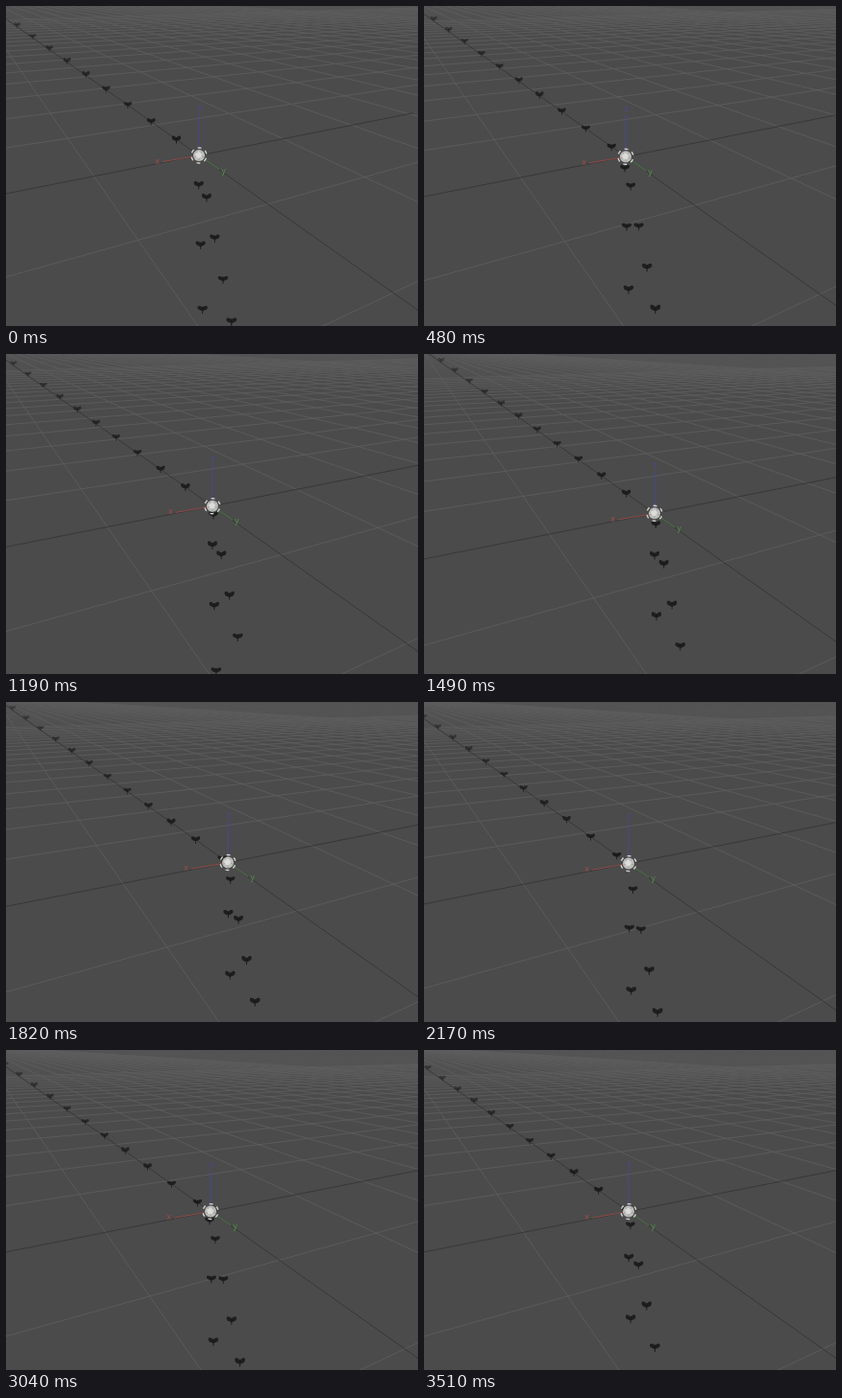
Animation, 429 px wide and 334 px high, one loop 3.61 s. Source, as an HTML page with a canvas:

```html
<!DOCTYPE html>
<html lang="en">
<head>
<meta charset="utf-8">
<title>Particle emitter in a 3D viewport</title>
<style>
  html, body { margin: 0; width: 100%; height: 100%; overflow: hidden; background: #4b4b4b; }
  canvas { display: block; width: 429px; height: 334px; }
</style>
</head>
<body>
<canvas id="view" width="429" height="334"></canvas>
<script>
const ctx = document.getElementById('view').getContext('2d');
const W = 429, H = 334, LOOP = 3610, STEPS = 61;

// Playback steps last 60 ms, a few of them 50 or 70 ms.
const SHORT = new Set([17, 25, 26, 27, 33, 37, 38, 42, 45, 58]);
const starts = [0];
for (let k = 0; k < STEPS - 1; k++) {
  starts.push(starts[k] + (SHORT.has(k) ? 50 : k === 47 ? 70 : 60));
}

// Screen position of the world origin while the view is panned: [ms, x, y].
const PAN = [[0, 201, 156], [60, 201, 156], [440, 210, 157.3], [1090, 210, 157.3],
  [1480, 240, 166.3], [1600, 240, 167], [2170, 213, 168.6], [LOOP, 213, 168.6]];

// Vanishing points relative to the origin, and perspective change per grid cell.
const VX = [872, -173], VY = [-244, -173];
const CELL_X = 0.1115, CELL_Y = 0.2266;
const RATE = 3.5, PHASE = 0.835;

function origin(t) {
  let i = 1;
  while (PAN[i][0] < t) i++;
  const [t0, x0, y0] = PAN[i - 1], [t1, x1, y1] = PAN[i];
  const u = (t - t0) / (t1 - t0), e = u * u * (3 - 2 * u);
  return [x0 + (x1 - x0) * e, y0 + (y1 - y0) * e];
}

function onAxis(vp, s) {
  return [vp[0] * s / (1 + s), vp[1] * s / (1 + s)];
}

function ray(vp, p) {
  const dx = p[0] - vp[0], dy = p[1] - vp[1], k = 2200 / Math.hypot(dx, dy);
  ctx.moveTo(vp[0], vp[1]);
  ctx.lineTo(vp[0] + dx * k, vp[1] + dy * k);
}

function gridLines(from, to, color) {
  ctx.strokeStyle = color;
  ctx.beginPath();
  for (let n = from; n <= to; n++) if (n) ray(VX, onAxis(VY, n * CELL_Y));
  ctx.stroke();
  ctx.beginPath();
  for (let n = from; n <= to; n++) if (n && n > -2) ray(VY, onAxis(VX, n * CELL_X));
  ctx.stroke();
}

function line(x0, y0, x1, y1, color) {
  ctx.strokeStyle = color;
  ctx.beginPath();
  ctx.moveTo(x0, y0);
  ctx.lineTo(x1, y1);
  ctx.stroke();
}

function label(text, x, y, color) {
  ctx.fillStyle = color;
  ctx.fillText(text, x, y);
}

function drawFloor() {
  ctx.lineWidth = 0.7;
  gridLines(21, 110, '#555555');
  ctx.lineWidth = 0.85;
  gridLines(-2, 20, '#5e5e5e');
  line(-260, 51.6, 223, -44.3, '#353535');
  ctx.strokeStyle = '#353535';
  ctx.beginPath();
  ray(VY, [0, 0]);
  ctx.stroke();
}

function drawAxes() {
  ctx.lineWidth = 1;
  line(0, 0, -38, 6.6, '#8f4a47');
  line(0, 0, 21, 14.5, '#4a7a45');
  line(0, 0, 0, -44, '#4a488f');
  label('x', -43.5, 6.5, '#a04a46');
  label('y', 25.5, 16.5, '#4f9048');
  label('z', 0.5, -49, '#4a489a');
}

function bird(x, y, size, alpha, flap) {
  const tip = -3.2 + 0.6 * flap;
  ctx.save();
  ctx.translate(x, y);
  ctx.scale(size, size);
  ctx.globalAlpha = alpha;
  ctx.fillStyle = '#1b1b1b';
  for (const side of [-1, 1]) {
    ctx.beginPath();
    ctx.moveTo(0, -1.2);
    ctx.quadraticCurveTo(side * 2, tip - 1, side * 4.8, tip);
    ctx.quadraticCurveTo(side * 6, -0.6, side * 3.6, 0.9);
    ctx.lineTo(side * 1.2, 1.9);
    ctx.lineTo(0, 1.9);
    ctx.fill();
  }
  ctx.fillRect(-0.8, -2.2, 1.6, 4.4);
  ctx.fillRect(-0.5, 2, 1, 3);
  ctx.restore();
}

// Three streams leave the emitter; q is the age in emission periods.
function drawBirds(phase) {
  for (let j = 11; j >= 0; j--) {
    const q = j + phase, flap = Math.sin(q * 5);
    const d = 29.2 * q / (1 + 0.041 * q);
    bird(-d, -0.72 * d, 0.92 - 0.024 * q, 1 - 0.055 * q, flap);
    if (j > 5) continue;
    const size = 0.93 + 0.03 * q;
    const right = 9 + 41 * q + 0.45 * q * q;
    bird(0.2 * right - 0.8, right, size, 0.95, flap);
    const down = -18 + 56 * q + 2.4 * q * q;
    if (down > 7) bird(0.03 * down - 1.2, down, size, 0.95, flap);
  }
}

function drawEmitter() {
  ctx.fillStyle = '#bdbdbb';
  ctx.beginPath();
  ctx.arc(0, 0, 6, 0, 7);
  ctx.fill();
  ctx.fillStyle = '#dcdcda';
  ctx.beginPath();
  ctx.arc(-0.5, -0.5, 3.2, 0, 7);
  ctx.fill();
  ctx.strokeStyle = '#d0d0ce';
  ctx.lineWidth = 1.4;
  for (let i = 0; i < 6; i++) {
    const a = i * Math.PI / 3 + 0.6;
    ctx.beginPath();
    ctx.arc(0, 0, 8, a - 0.24, a + 0.24);
    ctx.stroke();
  }
  ctx.lineWidth = 0.6;
  for (let i = 0; i < 5; i++) {
    const a = i * Math.PI * 0.4 + 0.3, c = Math.cos(a), s = Math.sin(a);
    line(3 * c, 3 * s, 6 * c, 6 * s, '#8d8d8b');
  }
}

function draw(t) {
  const [x, y] = origin(t);
  ctx.setTransform(1, 0, 0, 1, 0, 0);
  ctx.fillStyle = '#4b4b4b';
  ctx.fillRect(0, 0, W, H);
  ctx.translate(x, y);
  ctx.font = '8px "DejaVu Sans", sans-serif';
  ctx.textAlign = 'center';
  ctx.textBaseline = 'middle';
  drawFloor();
  drawAxes();
  drawBirds((PHASE + RATE * t / 1000) % 1);
  drawEmitter();
}

const begin = performance.now();
function tick() {
  const t = (performance.now() - begin) % LOOP;
  let k = STEPS - 1;
  while (starts[k] > t) k--;
  draw(starts[k]);
  requestAnimationFrame(tick);
}
tick();
</script>
</body>
</html>
```
